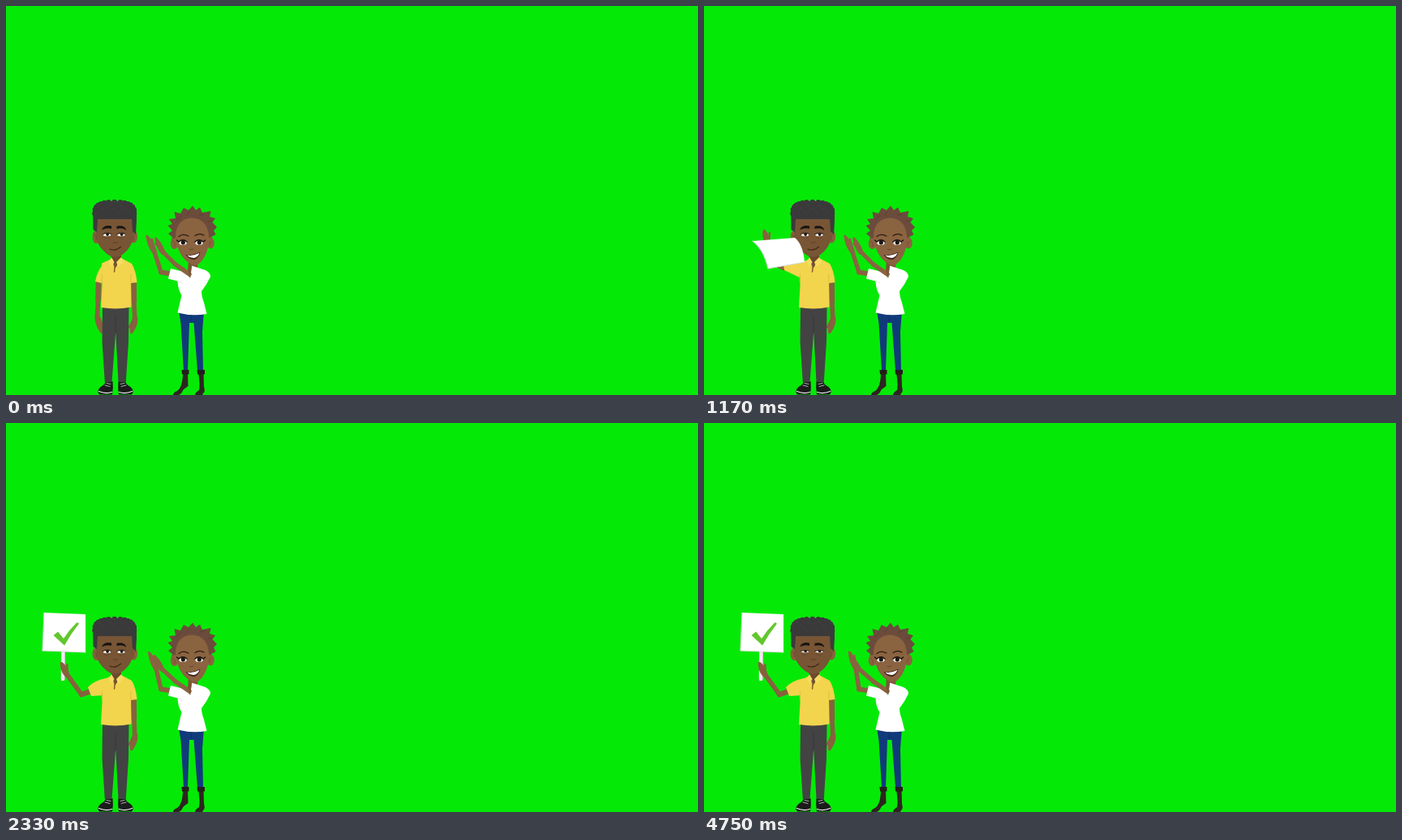
Write an HTML page with a canvas that moves like this. It is 853 px wide and 480 px high and loops after 4.83 s.

```html
<!DOCTYPE html>
<html lang="en">
<head>
<meta charset="utf-8">
<title>Applause</title>
<style>
html, body { margin: 0; width: 100%; height: 100%; overflow: hidden; background: #04ea06; }
canvas { display: block; }
</style>
</head>
<body>
<canvas id="stage" width="853" height="480"></canvas>
<script>
const ctx = document.getElementById('stage').getContext('2d');
const LOOP = 4830, STEP = 1000 / 12;
const GREEN = '#04ea06', SKIN = '#87613d', FACE = '#775535', HER_SKIN = '#8a6340';
const YELLOW = '#f2d44d', HAIR = '#3a3a3b', DARK = '#1d1714', BOOT = '#2d2520';

const fill = (d, color) => { ctx.fillStyle = color; ctx.fill(new Path2D(d)); };
const line = (d, color, width) => {
  ctx.strokeStyle = color;
  ctx.lineWidth = width;
  ctx.lineCap = ctx.lineJoin = 'round';
  ctx.stroke(new Path2D(d));
};
const oval = (x, y, rx, ry, color) => {
  ctx.fillStyle = color;
  ctx.beginPath();
  ctx.ellipse(x, y, rx, ry, 0, 0, 7);
  ctx.fill();
};
const mix = (a, b, u) => a + (b - a) * u;

// keys: [[step, values], ...], eased between neighbours
function pose(keys, k) {
  let i = 0;
  while (i < keys.length - 2 && k >= keys[i + 1][0]) i++;
  const [k0, a] = keys[i], [k1, b] = keys[i + 1];
  const u = Math.min(1, Math.max(0, (k - k0) / (k1 - k0)));
  const e = u * u * (3 - 2 * u);
  return a.map((v, n) => mix(v, b[n], e));
}

// sleeve outer, sleeve inner, elbow, wrist, fingertips
const REST = [110, 340, 118, 342, 113.5, 362, 112.5, 384, 118, 404];
const HIP = [101, 331, 109, 341, 97, 344.5, 115, 363, 124, 370];
const PAPER = [98, 320, 99, 326, 84, 316, 79, 292, 74, 276];
const HIGH = [99, 317, 103, 329, 90, 318, 75, 283, 68, 260];
const SIGN = [101, 326, 105, 337, 93, 335, 75, 310, 68, 295];
const ARM = [[0, REST], [4, HIP], [9, HIP], [14, PAPER], [16, HIGH], [19, SIGN], [20, SIGN]];

// four corners and bend
const BOARD = [47, 234, 98, 236, 98, 283, 45, 281, 0];
const SHEET = [
  [12, [98, 332, 118, 328, 122, 350, 104, 356, 1]],
  [14, [60, 290, 112, 286, 124, 316, 79, 324, 1]],
  [16, [42, 198, 93, 201, 92, 248, 39, 245, .15]],
  [19, BOARD], [20, BOARD]
];

function limb(points, w0, w1, color) {
  const n = points.length - 1;
  for (let i = 0; i < n; i++) {
    line(`M${points[i]}L${points[i + 1]}`, color, mix(w0, w1, n > 1 ? i / (n - 1) : 0));
  }
}

function hand(x0, y0, x1, y1, w, thumb, color) {
  const len = Math.hypot(x1 - x0, y1 - y0);
  ctx.save();
  ctx.translate(x0, y0);
  ctx.rotate(Math.atan2(y1 - y0, x1 - x0));
  fill(`M-3 -2.5C${len * .2} ${-w} ${len * .5} ${-w} ${len} -1.5L${len} .8
    C${len * .7} ${w * .7} ${len * .35} ${w} -3 2.5Z`, color);
  line(`M${len * .25} ${thumb}L${len * .65} ${thumb * 1.9}`, color, 2.4);
  ctx.restore();
}

function shoe(dir) {
  ctx.save();
  ctx.translate(135, 0);
  ctx.scale(dir, 1);
  fill('M3.5 463H12Q13 467 17 469Q22 472 21.5 477L20 479.5H4Q2.5 471 3.5 463Z', '#1b1b1c');
  line('M4.5 476.5Q12 479 20.5 475.5', '#f0f0f0', 1.3);
  line('M6 466.5L11 465.5M7 469.5L13 468', '#d5d5d5', .8);
  ctx.restore();
}

function manHead(shift, blink) {
  ctx.save();
  ctx.translate(5 * shift, 0);
  oval(111.5, 285, 5, 8, SKIN);
  oval(157, 284.5, 5, 8, SKIN);
  fill('M111 256H157V284C156 294 150 302 143 307Q134 312.5 126 307C118 301 112 294 111 284Z', FACE);
  line('M109 282Q112 284 111 289M159 282Q156 284 157 289', '#694627', .8);
  fill('M107 250H161V265L160 282L156 278L155 262.5H113L112 279L107.5 276Z', HAIR);
  fill('M109 263V249Q111 242 122 241H146Q158 242 159 250V263Z', HAIR);
  for (let i = 0; i <= 14; i++) {
    const a = Math.PI * (1 + i / 14), c = Math.cos(a);
    const x = 133.7 + 24 * Math.sign(c) * Math.abs(c) ** .8;
    oval(x, 256 - 13.8 * Math.abs(Math.sin(a)) ** .7, 3.5, 3.5, HAIR);
  }
  for (let i = 0; i < 10; i++) {
    line(`M${113 + i * 4.6} ${246 + i % 3 * 4}q2 -2 3 1`, '#454546', .8);
  }
  fill('M118.5 275Q122 269.5 130 271.5L130 274.8Q124 273 118.5 276Z', '#171411');
  fill('M148 275.5Q145 270 136.5 271.8L136.5 275Q143 273 148 276.5Z', '#171411');
  const open = 2.1 - 1.1 * blink;
  for (const x of [124.5, 142]) {
    oval(x, 282, 4.8, open + .1, '#f5f2ec');
    oval(x + .6, 281.8, 1.9, open, DARK);
    line(`M${x - 5} 281.5Q${x} ${279 + blink} ${x + 5} 281.2`, '#2c1c12', 1.1);
    line(`M${x - 3.5} 286Q${x} 287 ${x + 3.5} 285.5`, '#644326', .6);
  }
  line('M132 291.5Q134.5 294 137.5 291.5', '#5c3d20', .9);
  line(`M128 ${mix(300, 299, shift)}Q135 ${mix(303, 302.5, shift)} 141.5 ${mix(297, 299, shift)}`, '#3d2415', 1.1);
  ctx.restore();
}

function sign([ax, ay, bx, by, cx, cy, dx, dy, bend], held) {
  const bow = (x, y, u, v) => `Q${(x + u) / 2 + 4 * bend} ${(y + v) / 2 - 7 * bend} ${u} ${v}`;
  if (held) {
    const x = (cx + dx) / 2 - 1, y = (cy + dy) / 2;
    line(`M${x} ${y}L${x - .5} ${y + 34}`, '#f1f1f1', 4.6);
    line(`M${x + 2} ${y}L${x + 1.5} ${y + 35}`, '#c8cec6', 1);
  }
  const sheet = `M${ax} ${ay}L${bx} ${by}${bow(bx, by, cx, cy)}L${dx} ${dy}${bow(dx, dy, ax, ay)}Z`;
  fill(sheet, '#fff');
  line(`M${ax} ${ay}${bow(ax, ay, dx, dy)}L${cx} ${cy}`, '#d9ddd8', 1.2);
  if (held) {
    ctx.save();
    ctx.translate(ax - 47, ay - 234);
    fill('M58.5 262L64 257.5L71 266Q78 255 87.5 246L90 247.5Q80 260 72 274.5Z', '#62c62e');
    ctx.restore();
  }
}

function man(k) {
  const [ox, oy, ix, iy, ex, ey, wx, wy, hx, hy] = pose(ARM, k);
  const shift = pose([[0, [0]], [4, [1]], [9, [1]], [13, [0]]], k)[0];
  const blink = k === 32 || k === 57 ? .7 : 0;
  const held = k > 14;
  const palm = () => hand(wx, wy, hx, hy, 5, k < 10 ? -2.3 : 2.8, SKIN);

  limb([[(ox + ix) / 2, (oy + iy) / 2], [ex, ey], [wx, wy]], 6.6, 5.6, SKIN);
  if (!held) palm();
  limb([[157.5, 340], [157.8, 364], [158.8, 387]], 6.6, 5.6, SKIN);
  hand(159, 386, 154, 404, 5, 2.3, SKIN);

  shoe(-1);
  shoe(1);
  fill('M119 369H151.5L151 414L147.8 464H138.5L135.2 402L130.5 464H121.8L118.5 414Z', '#434344');
  line('M135 383L135 404', '#363637', .8);

  fill(`M123 315Q${(ox + 117) / 2 - 1} ${(oy + 318) / 2 - 4} ${ox} ${oy}L${ix} ${iy}L120 336Z`, YELLOW);
  fill('M130 312L118 317.5L118.5 345L117 372Q136 375 154.5 371.5L154 342L161.5 341Q160 326 155 318L142 311Z', YELLOW);
  line('M118.5 331L118 340M153.8 331L154 341', '#d9b93c', .8);
  fill('M129 303H142V311L134.5 324L130 313Z', '#6b4a2d');
  fill('M130 310L126.5 316L130.5 322L133.5 316Z', '#f6dc62');
  fill('M142 310L145 316L138 322L136 316Z', '#f6dc62');
  line('M134.5 318L133.5 328', '#80602c', 1.5);
  manHead(shift, blink);

  if (k > 12) sign(pose(SHEET, k), held);
  if (held) palm();
}

function womanHead() {
  fill(`M204 289L205 285L200 281L205 277L199.5 271L205 269L201 263L209 262L207.5 254
    L215 256L219 249L225 252L230 246.5L234 252L239 248.5L242 255L252.5 253L251 260
    L258 262L254.5 267L260 273L256 277L258.5 282L253 285L255 289Z`, '#6b4b3b');
  line('M211 264L216 259M223 258L226 254M239 258L244 257M249 266L253 265', '#5c3e30', 1);
  oval(207.5, 293, 4.8, 7, HER_SKIN);
  oval(252, 292.5, 4.8, 7, HER_SKIN);
  fill('M209 284C209 270 217 262 229 261.5C242 262 249 270 250 284C251 300 244 316 234 320C222 319 210 304 209 284Z', HER_SKIN);
  line('M206 290Q209 292 208 297M253 290Q250 292 251 296', '#704a2b', .8);
  line('M213 284.5Q218 280 225 284M233 283.5Q239 279.5 244 283', '#2b1a10', 1.2);
  for (const [x, side] of [[218, -1], [238, 1]]) {
    oval(x, 292, 4.8, 2.9, '#fbf8f3');
    oval(x + .3, 291.8, 2.6, 2.8, DARK);
    line(`M${x - 5} 291Q${x} 286.5 ${x + 5} 291M${x + 5 * side} 291L${x + 7.5 * side} 289`, '#15100c', 1.4);
  }
  line('M226 300Q228 302 231 300', '#65422a', .9);
  fill('M221.5 307Q231 308 239.5 303.5Q238 311 232 313Q225 312.5 221.5 307Z', '#43211a');
  fill('M223.5 307.6Q231 308.8 238.5 304.8Q236.5 310 231.5 311Q226 310.8 223.5 307.6Z', '#fff');
}

function woman(k) {
  const clap = [0, 0, 1, .5, 0][k % 5];

  fill('M218 452H224L224.5 469L219 473L216 478L213 480H206Q206 477 211 475Q218 470 218 452Z', BOOT);
  fill('M237 452H243.5L244 470Q246 475 243 478L242 480H233Q233 477 238 474Q239.5 468 237 452Z', BOOT);
  fill('M213 376H244L242 402L243 450H236L231.5 391H226L224 450H219L215.5 392Z', '#113a7b');
  fill('M216.5 449H225.5V454.5H217ZM235.5 449H245V454.5H236Z', '#241d19');
  line('M228 381L228.5 390', '#0b2c63', .8);

  const lw = [mix(182.5, 187, clap), 302], rw = [mix(193, 190.5, clap), 303];
  hand(...rw, mix(184.5, 181, clap), mix(285.5, 288, clap), 4.2, -1.8, HER_SKIN);
  limb([[207, 331], [191, 328.5], lw], 6, 5.4, HER_SKIN);

  fill('M225 310H237L236 322L228 337L224 330Z', '#7b5636');
  fill(`M229 320.5L246 326Q252 329 252 334Q248 343 241 352Q241 358 244 366
    L247.5 380Q229 383 211.5 378.5L216.5 357Q212 350 211.5 339.5L200 336.5L203 324L223 329L227 336Z`, '#fff');
  line('M212 339L217 342', '#d8ddd9', .8);
  limb([[226, 331], [209, 319], rw], 5.4, 5.2, HER_SKIN);
  fill('M224 325L229 321L227 336Z', '#7b5636');
  womanHead();
  hand(...lw, mix(173.5, 179, clap), mix(282.5, 281.5, clap), 4.5, 2, HER_SKIN);
}

function draw(now) {
  const k = Math.min(57, Math.floor((now % LOOP + 5) / STEP));
  ctx.fillStyle = GREEN;
  ctx.fillRect(0, 0, 853, 480);
  man(k);
  woman(k);
}

const start = performance.now();
function tick() {
  draw(performance.now() - start);
  requestAnimationFrame(tick);
}
tick();
</script>
</body>
</html>
```
